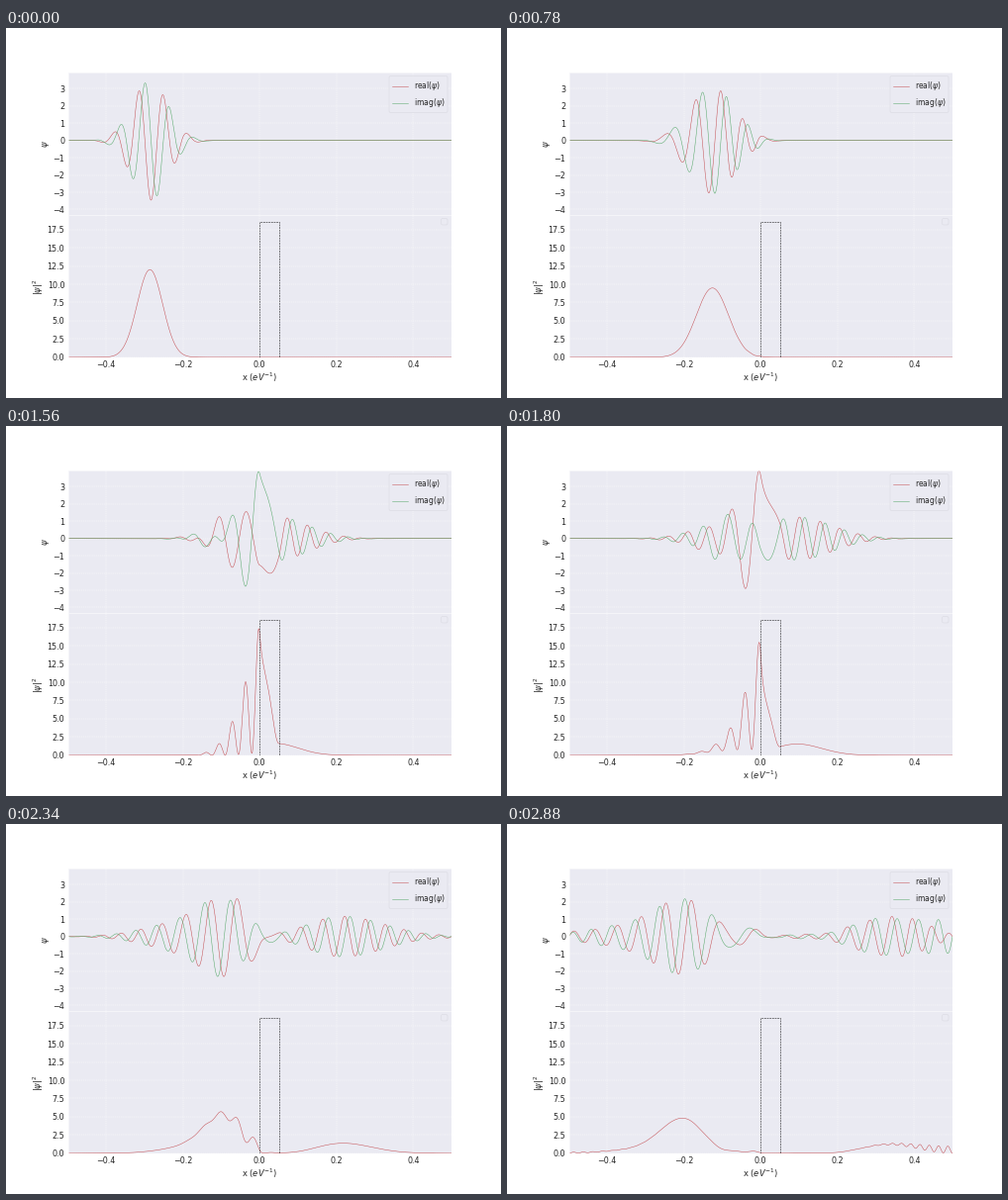
These frames come from a looping animation (500 by 374 pixels, 2910 ms). A matplotlib script:

```python
import numpy as np
import matplotlib.pyplot as plt
from matplotlib.animation import FuncAnimation
from matplotlib.patches import FancyBboxPatch

W, H = 500, 374
FRAMES, INTERVAL = 97, 30
PX = 0.72  # points per pixel at 100 dpi
RED, GREEN, INK, PANEL = "#c44e52", "#55a868", "#262626", "#eaeaf2"

# Wave packet in a box with hard walls at +-0.5; time is counted in frames
K0, X0, S0, PHASE = 97.7, -0.2935, 0.0332, 2.505
KINETIC = 3.16e-5
BARRIER, K_BARRIER = (0.0, 0.05), 101.8
START = 1.2

N = 1000
dx = 1 / N
x = np.linspace(-0.5, 0.5, N + 1)
xi = x[1:-1]


def make_hamiltonian():
    lo, hi = BARRIER
    inside = np.clip((xi - lo) / dx + 0.5, 0, 1) * np.clip((hi - xi) / dx + 0.5, 0, 1)
    hop = np.full(N - 2, -KINETIC / dx**2)
    diag = 2 * KINETIC / dx**2 + KINETIC * K_BARRIER**2 * inside
    return np.diag(diag) + np.diag(hop, 1) + np.diag(hop, -1)


energy, modes = np.linalg.eigh(make_hamiltonian())
packet = np.exp(-((xi - X0) ** 2) / (4 * S0**2) + 1j * (K0 * (xi - X0) + PHASE))
packet /= np.sqrt(np.sum(np.abs(packet) ** 2) * dx)
weights = modes.T @ packet


def psi_at(t):
    psi = np.zeros(N + 1, complex)
    psi[1:-1] = modes @ (weights * np.exp(-1j * energy * t))
    return psi


plt.rcParams.update({"font.family": "DejaVu Sans", "text.color": INK})
fig = plt.figure(figsize=(W / 100, H / 100), dpi=100, facecolor="white")


def make_panel(bottom, ylim, yticks, fmt):
    ax = fig.add_axes([0.125, bottom, 0.775, 0.385], facecolor=PANEL)
    ax.set_xlim(-0.5, 0.5)
    ax.set_ylim(*ylim)
    ax.set_xticks([-0.4, -0.2, 0, 0.2, 0.4])
    ax.set_yticks(yticks)
    ax.yaxis.set_major_formatter(lambda v, _: fmt.format(v).replace("-", "\u2212"))
    ax.tick_params(length=0, pad=3.3 * PX, labelsize=8 * PX, labelcolor=INK)
    ax.grid(color="white", ls="--", lw=0.4 * PX)
    ax.set_axisbelow(True)
    for spine in ax.spines.values():
        spine.set(color="white", linewidth=0.5 * PX)
    return ax


top = make_panel(0.495, (-4.31, 3.95), range(-4, 4), "{:.0f}")
low = make_panel(0.11, (0, 19.5), np.arange(0, 18, 2.5), "{:.1f}")
top.tick_params(labelbottom=False)
low.spines["bottom"].set_visible(False)

thin = dict(lw=0.5 * PX)
real_line, = top.plot([], [], color=RED, **thin)
imag_line, = top.plot([], [], color=GREEN, **thin)
prob_line, = low.plot([], [], color=RED, **thin)
low.plot(np.repeat(BARRIER, 2), [0, 18.6, 18.6, 0], color="black", ls="--", **thin)

# Labels and legends, laid out in pixels
page = fig.add_axes([0, 0, 1, 1])
page.set_xlim(0, W)
page.set_ylim(H, 0)
page.axis("off")


def label(px, py, text, size=8.4, **kw):
    page.text(px, py, text, fontsize=size * PX, **{"ha": "center", "va": "center", **kw})


def frame_box(x0, y0, x1, y1):
    page.add_patch(FancyBboxPatch(
        (x0, y0), x1 - x0, y1 - y0, boxstyle="round,pad=0,rounding_size=1.6",
        fc=PANEL, ec="#d6d6de", lw=0.6 * PX, alpha=0.8))


label(40.5, 117.5, r"$\psi$", rotation=90)
label(32.5, 261.7, r"$|\psi|^2$", rotation=90)
label(256, 353, r"x ($eV^{-1}$)")

frame_box(387, 48.5, 446, 85.5)
frame_box(439.5, 192.5, 446, 199)
for py, color, name in [(58.5, RED, "real"), (75.5, GREEN, "imag")]:
    page.plot([390, 406], [py, py], color=color, **thin)
    label(412.5, py, name + r"($\psi$)", size=7.7, ha="left")


def update(i):
    psi = psi_at(START + i)
    real_line.set_data(x, psi.real)
    imag_line.set_data(x, psi.imag)
    prob_line.set_data(x, np.abs(psi) ** 2)
    return real_line, imag_line, prob_line


anim = FuncAnimation(fig, update, frames=FRAMES, interval=INTERVAL,
                     init_func=lambda: update(0), repeat=True, repeat_delay=0)
plt.show()
```
